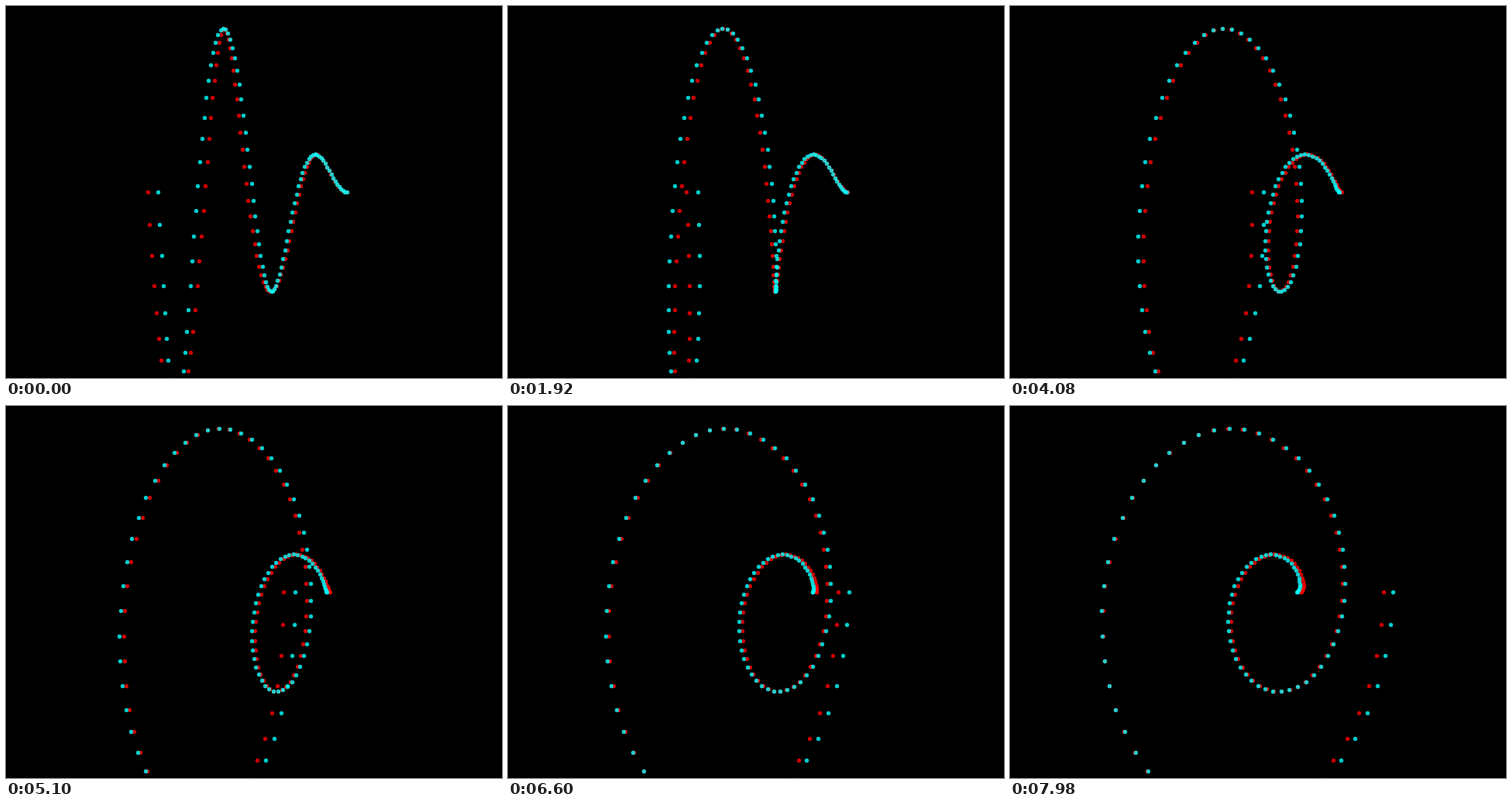
Animation of 640 by 480 pixels, one loop 8 s. Source, as an HTML page with a canvas:

```html
<!DOCTYPE html>
<html lang="en">
<head>
<meta charset="utf-8">
<title>Stereo spiral</title>
<style>
  html, body { margin: 0; width: 100%; height: 100%; overflow: hidden; background: #000; }
  canvas { display: block; }
</style>
</head>
<body>
<canvas id="stage" width="640" height="480"></canvas>
<script>
const ctx = document.getElementById('stage').getContext('2d');
const LOOP = 8000, STEP = 60, LAST = 99;
const RAD = Math.PI / 180;
const HALF_EYE = 1.5 * RAD;

// Conical spiral: two turns, shrinking linearly to a point.
const points = Array.from({ length: LAST + 1 }, (_, i) => {
  const u = i / LAST, turn = 4 * Math.PI * u;
  return {
    x: 251.2 * (1 - u) * Math.cos(turn),
    y: 335 * (1 - u) * Math.sin(turn),
    z: -130.7 + 250.5 * u
  };
});

// Angle around the vertical axis: a steady turn plus a slow swing.
function angleAt(step) {
  const w = 0.0175, peak = 103;
  const swing = (Math.sin(w * (step - peak)) + Math.sin(w * peak)) / w;
  return (0.05 + 0.3169 * step + 0.257 * swing) * RAD;
}

function drawEye(angle, color) {
  const c = Math.cos(angle), s = Math.sin(angle);
  ctx.fillStyle = color;
  for (const p of points) {
    // Dots sit on whole pixels.
    const x = Math.floor(320.3 + p.z * c + p.x * s) + 0.5;
    const y = Math.floor(240.5 + p.y) + 0.5;
    ctx.beginPath();
    ctx.arc(x, y, 2.7, 0, 2 * Math.PI);
    ctx.fill();
  }
}

function draw(time) {
  const angle = angleAt(Math.floor((time % LOOP) / STEP));
  ctx.fillStyle = '#000';
  ctx.fillRect(0, 0, 640, 480);
  drawEye(angle - HALF_EYE, 'rgba(255, 0, 0, 0.8)');
  drawEye(angle + HALF_EYE, 'rgba(0, 255, 255, 0.8)');
}

let start = null;
function tick(now) {
  if (start === null) start = now;
  draw(now - start);
  requestAnimationFrame(tick);
}
draw(0);
requestAnimationFrame(tick);
</script>
</body>
</html>
```
